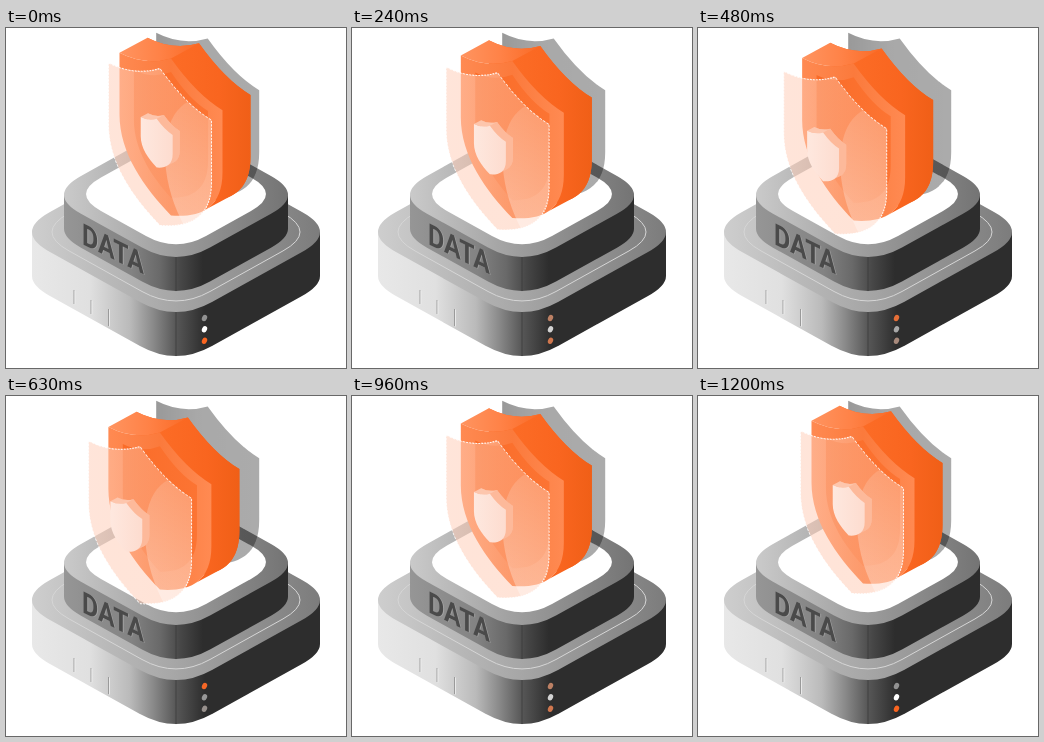
Recreate the animation shown at these times as an HTML page. Size 340 by 340 pixels, loop 1870 ms.

```html
<!DOCTYPE html>
<html lang="en">
<head>
<meta charset="utf-8">
<title>Data shield</title>
<style>
  html, body { margin: 0; width: 100%; height: 100%; overflow: hidden; background: #fff; }
  svg { display: block; width: 100vw; height: 100vh; }
  text { font: 700 30px Roboto, Arial, sans-serif; }
</style>
</head>
<body>
<svg id="stage" viewBox="0 0 340 340"></svg>
<script>
const NS = 'http://www.w3.org/2000/svg';
const stage = document.getElementById('stage');

function add(parent, tag, attrs, content) {
  const el = document.createElementNS(NS, tag);
  for (const name in attrs) el.setAttribute(name, attrs[name]);
  if (content) el.textContent = content;
  parent.appendChild(el);
  return el;
}

const defs = add(stage, 'defs', {});

// Each stop is [offset, colour, opacity].
function gradient(id, stops, dir = {}) {
  const g = add(defs, 'linearGradient', { id, ...dir });
  for (const [offset, color, alpha = 1] of stops)
    add(g, 'stop', { offset, 'stop-color': color, 'stop-opacity': alpha });
  return `url(#${id})`;
}
const DOWN = { x1: 0, y1: 0, x2: 0, y2: 1 };

// Isometric base: rounded rhombi centred on x = 170.
const CX = 170, SLOPE = 0.556;

function rhombus(ext, r, cy) {
  const w = ext + r / 2, h = w * SLOPE, c = w - r, d = r * SLOPE;
  const p = (x, y) => `${CX + x} ${cy + y}`;
  return `M${p(-c, -d)}Q${p(-w, 0)} ${p(-c, d)}L${p(-r, h - d)}Q${p(0, h)} ${p(r, h - d)}` +
    `L${p(c, d)}Q${p(w, 0)} ${p(c, -d)}L${p(r, d - h)}Q${p(0, -h)} ${p(-r, d - h)}Z`;
}

function wall(ext, r, cy, height) {
  const w = ext + r / 2, h = w * SLOPE, c = w - r, d = r * SLOPE;
  const p = (x, y) => `${CX + x} ${cy + height + y}`;
  return `M${CX - ext} ${cy}V${cy + height}Q${p(-ext, d / 2)} ${p(-c, d)}L${p(-r, h - d)}` +
    `Q${p(0, h)} ${p(r, h - d)}L${p(c, d)}Q${p(ext, d / 2)} ${p(ext, 0)}V${cy}Z`;
}

function box(ext, r, cy, height, side, top) {
  const front = cy + ext * SLOPE;
  add(stage, 'path', { d: wall(ext, r, cy, height), fill: side });
  add(stage, 'path', { d: `M${CX} ${front}v${height}`, stroke: '#333', 'stroke-width': .6 });
  add(stage, 'path', { d: rhombus(ext, r, cy), fill: top });
}

box(144, 36, 204, 44,
  gradient('lowSide', [[0, '#e8e8e8'], [.2, '#e0e0e0'], [.34, '#bababa'], [.42, '#8a8a8a'], [.5, '#575757'], [.6, '#2d2d2d']]),
  gradient('lowTop', [[0, '#cecece'], [.5, '#a6a6a6'], [1, '#7c7c7c']]));
add(stage, 'path', { d: rhombus(124, 34, 204), fill: 'none', stroke: '#d6d6d6', 'stroke-width': 1 });

for (const [x, y, len] of [[68, 262, 14], [85, 272, 14], [102.5, 281, 17]]) {
  add(stage, 'path', { d: `M${x} ${y}v${len}`, stroke: '#8d8d8d', 'stroke-width': .8 });
  add(stage, 'path', { d: `M${x + 1} ${y + .5}v${len}`, stroke: '#f0f0f0', 'stroke-width': .8 });
}

box(112, 34, 166.8, 34,
  gradient('upSide', [[0, '#969696'], [.3, '#838383'], [.43, '#696969'], [.52, '#474747'], [.62, '#2d2d2d']]),
  gradient('upTop', [[0, '#cacaca'], [.5, '#9c9c9c'], [1, '#747474']]));
add(stage, 'path', { d: rhombus(90, 30, 166.3), fill: '#fff' });

for (const [dx, fill] of [[.9, '#a2a2a2'], [0, '#4a4a4a']])
  add(stage, 'text', { transform: `matrix(.83 .41 0 1 ${76 + dx} ${216 + dx / 2})`, fill }, 'DATA');

const leds = [290, 301.3, 312.8].map(y =>
  add(stage, 'ellipse', { rx: 2.5, ry: 3.3, transform: `translate(198.5 ${y}) rotate(25)` }));

// Shield outline in its own plane; the origin is midway between the top corners.
const SHIELD = 'M-51.5 0Q-26-1 0-23Q26-1 51.5 0V62C51.5 100 27 121 0 134C-27 121-51.5 100-51.5 62Z';
const plane = (x, y, s = 1) => `matrix(${s} ${SLOPE * s} 0 ${s} ${x} ${y})`;

// Depth runs along (a, b) in the shield's plane.
function solid(g, a, b, { side, top, front }) {
  const p = (x, y) => `${x + a} ${y + b}`;
  add(g, 'path', { d: SHIELD, fill: side, transform: `translate(${a} ${b})` });
  add(g, 'path', {
    fill: side,
    d: `M0-23Q26-1 51.5 0V62C51.5 82.9 44 98.7 32.8 110.8L${p(32.8, 110.8)}` +
       `C${p(44, 98.7)} ${p(51.5, 82.9)} ${p(51.5, 62)}L${p(51.5, 0)}Q${p(26, -1)} ${p(0, -23)}Z`
  });
  add(g, 'path', {
    fill: top,
    d: `M-51.5 0Q-26-1 0-23L${p(0, -23)}Q${p(-26, -1)} ${p(-51.5, 0)}Z`
  });
  add(g, 'path', { d: SHIELD, fill: front });
}

add(stage, 'path', {
  d: SHIELD, transform: plane(201.7, 33.5),
  fill: gradient('shade', [[0, '#000', .4], [.4, '#000', .34], [1, '#000', .33]])
});

const orange = add(stage, 'g', {});
solid(orange, 28, -30.7, {
  side: gradient('side', [[0, '#fc6c26'], [.6, '#f9651f'], [1, '#f05f17']]),
  top: gradient('top', [[0, '#ff9460'], [.5, '#ff8247'], [1, '#fa6a25']]),
  front: gradient('front', [[0, '#ff8a52'], [.5, '#fb7a3c'], [1, '#ff8a52']])
});
add(orange, 'path', {
  d: SHIELD, transform: 'translate(0 9) scale(.72 .8)',
  fill: gradient('inset', [[0, '#fa6c28'], [1, '#fc7433']])
});

const glass = add(stage, 'g', {});
add(glass, 'path', {
  d: SHIELD,
  fill: gradient('pane', [[0, '#ffd0bc', .56], [.5, '#ffc4aa', .46], [1, '#ffb898', .4]])
});
add(add(defs, 'clipPath', { id: 'paneClip' }), 'path', { d: SHIELD });
add(glass, 'ellipse', {
  cx: 60, cy: 60, rx: 55, ry: 80, 'clip-path': 'url(#paneClip)',
  fill: gradient('gloss', [[0, '#fff', .1], [1, '#fff', .34]], DOWN)
});
add(glass, 'path', {
  d: SHIELD, fill: 'none', stroke: '#fff', 'stroke-width': 1,
  'stroke-dasharray': '2.2 1.2', 'stroke-opacity': .9
});

const badge = add(stage, 'g', {});
solid(badge, 23, -25, {
  side: '#fdb99a',
  top: '#fdc6ad',
  front: gradient('badge', [[0, '#fee8df'], [1, '#fddccf']])
});

// Rest position, travel and scale of each moving layer.
const layers = [
  [orange, 165, 53.5, -11.7, 6.4, 1],
  [glass, 154, 63.5, -21, 10.6, 1],
  [badge, 150.7, 98, -32, 17, .31]
];

const GRAY = [146, 146, 146], WHITE = [255, 255, 255], ORANGE = [250, 101, 32];
const lights = [[GRAY, ORANGE], [WHITE, GRAY], [ORANGE, GRAY]];
const mix = (a, b, k) => `rgb(${a.map((v, i) => Math.round(v + (b[i] - v) * k))})`;

const LOOP = 1870, TICK = 30, HALF = 600;

function draw(ms) {
  const t = Math.floor((ms % LOOP) / TICK) * TICK;
  const k = Math.max(0, 1 - Math.abs(t - HALF) / HALF);
  for (const [el, x, y, dx, dy, s] of layers)
    el.setAttribute('transform', plane(x + dx * k, y + dy * k, s));
  leds.forEach((led, i) => led.setAttribute('fill', mix(...lights[i], k)));
}

const start = performance.now();
function tick() {
  draw(performance.now() - start);
  requestAnimationFrame(tick);
}
draw(0);
requestAnimationFrame(tick);
</script>
</body>
</html>
```
